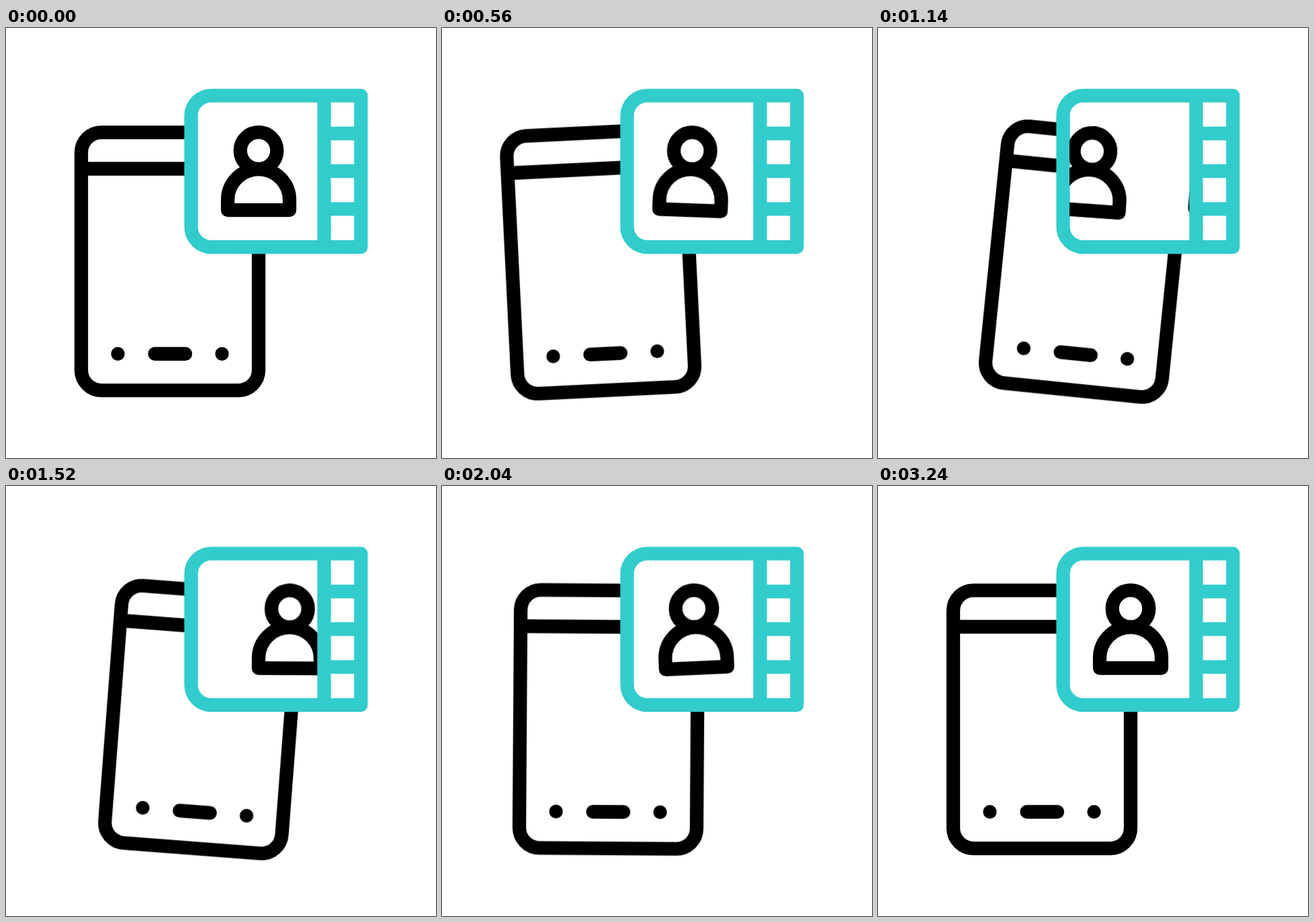
Recreate the animation shown at these times as an HTML page. Size 640 px wide and 640 px high, loop 3.6 s.

```html
<!DOCTYPE html>
<html lang="en">
<head>
<meta charset="utf-8">
<title>Phone video call</title>
<style>
  html, body { margin: 0; width: 100%; height: 100%; overflow: hidden; background: #fff; }
  svg { display: block; width: 100%; height: 100%; }
  .ink, .card { fill: none; stroke: #000; stroke-width: 20.3; stroke-linejoin: round; }
  .card { stroke: #3cc; }
  .round { stroke-linecap: round; }
  .phone, .slide, .tilt { animation: 3600ms linear infinite; }
  .phone { animation-name: phone; transform-origin: 244px 347.5px; }
  .slide { animation-name: slide; }
  .tilt { animation-name: tilt; transform-origin: 376px 182.5px; }

  @keyframes phone {
    0%, 5% { transform: translate(0, 0) rotate(0deg); animation-timing-function: cubic-bezier(.3, .1, .3, 1); }
    13.333% { transform: translate(-26px, 0) rotate(-5deg); animation-timing-function: cubic-bezier(.2, .25, .05, .92); }
    38.333% { transform: translate(68px, .4px) rotate(6.3deg); animation-timing-function: cubic-bezier(.2, .05, .05, .92); }
    64.444%, 100% { transform: translate(0, 0) rotate(0deg); }
  }
  @keyframes slide {
    0%, 5% { transform: translate(0, 0); animation-timing-function: cubic-bezier(.3, .1, .3, 1); }
    13.333% { transform: translate(-44px, 0); animation-timing-function: cubic-bezier(.2, .15, .05, .92); }
    34.444% { transform: translate(151px, 1px); animation-timing-function: cubic-bezier(.2, .15, .05, .92); }
    59.444% { transform: translate(-3px, 0); animation-timing-function: ease-in-out; }
    90%, 100% { transform: translate(0, 0); }
  }
  @keyframes tilt {
    0%, 5% { transform: rotate(0deg); }
    13.333% { transform: rotate(1.8deg); }
    33.333% { transform: rotate(4.3deg); animation-timing-function: cubic-bezier(.25, .1, .3, 1); }
    58.333% { transform: rotate(-2.6deg); animation-timing-function: ease-in-out; }
    90%, 100% { transform: rotate(0deg); }
  }
</style>
</head>
<body>
<svg viewBox="0 0 640 640">
  <defs>
    <clipPath id="window"><rect x="285" y="110" width="179" height="206"/></clipPath>
    <g id="person" class="ink">
      <circle cx="376" cy="182.5" r="27.3"/>
      <path d="M330 271V256a46 46 0 0 1 92 0V271Z"/>
    </g>
  </defs>

  <g class="phone">
    <rect class="ink" x="112" y="155.3" width="264" height="384" rx="30"/>
    <path class="ink" d="M112 209.5H376"/>
    <path class="ink round" d="M166.5 485h.01M221.5 485H267M321.5 485h.01"/>
  </g>

  <path class="card" style="fill:#fff" d="M528.3 100.6H305.5a30 30 0 0 0-30 30V296a30 30 0 0 0 30 30H528.3Z"/>

  <!-- Two figures share one ribbon, so one enters as the other leaves. -->
  <g clip-path="url(#window)">
    <g class="slide">
      <g class="tilt"><use href="#person"/></g>
      <g transform="translate(-205 0)"><g class="tilt"><use href="#person"/></g></g>
    </g>
  </g>

  <path class="card" d="M473.5 100.6V326M473.5 157H528M473.5 213H528M473.5 269.3H528"/>
</svg>
</body>
</html>
```
